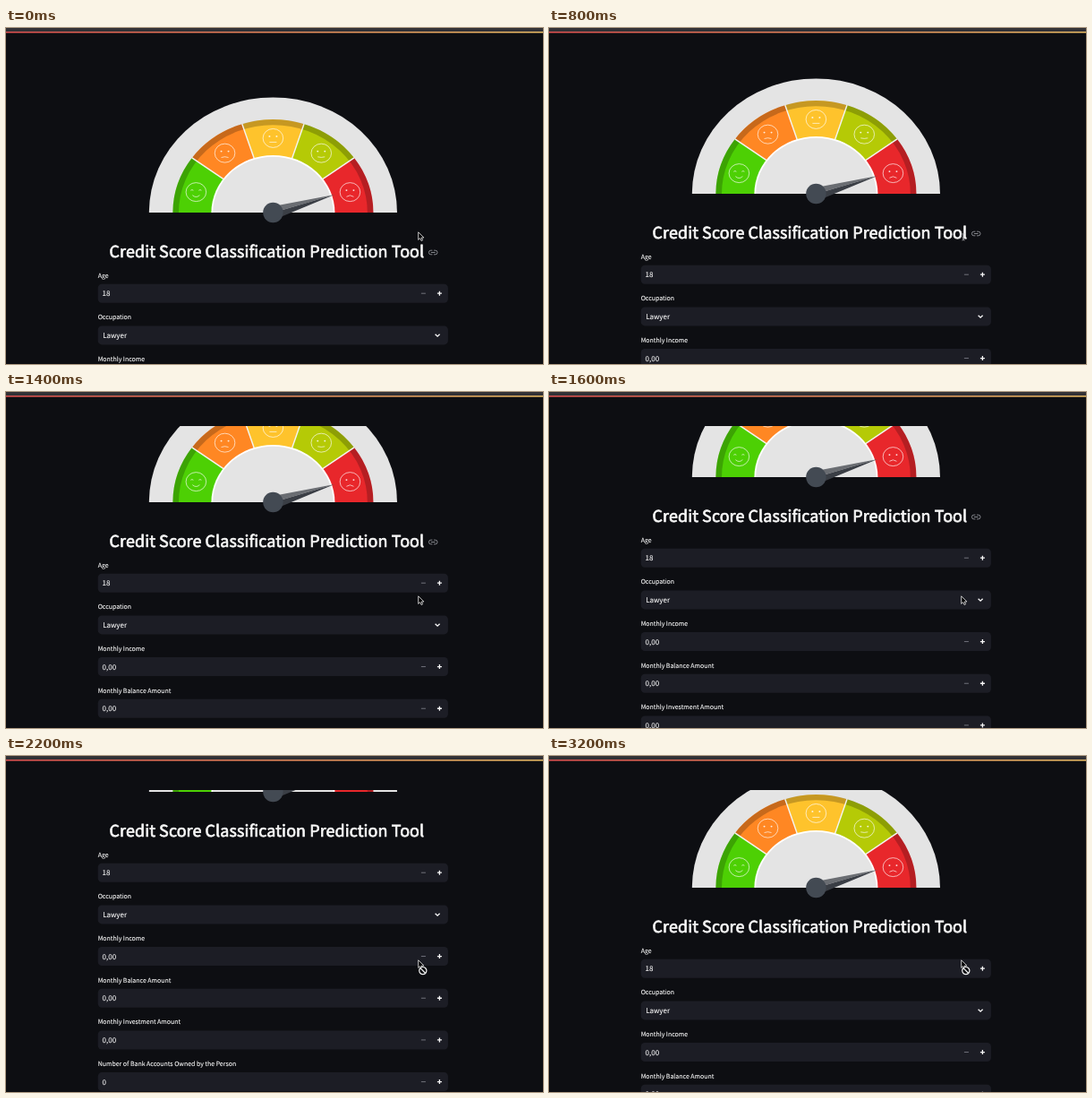
Animation of 600 by 375 pixels, one loop 3300 ms. Source, as an HTML page:

```html
<!DOCTYPE html>
<html lang="en">
<head>
<meta charset="utf-8">
<title>Credit score form</title>
<style>
  html, body { margin: 0; width: 100%; height: 100%; overflow: hidden; background: #0d0e12; }
  svg { display: block; width: 100vw; height: 100vh; }
  text {
    font-family: "Noto Sans CJK JP", "Noto Sans CJK SC", "Noto Sans CJK KR", "Noto Sans", sans-serif;
    font-weight: 400; fill: #fafafa; text-rendering: geometricPrecision;
  }
  .title { font-size: 17.9px; letter-spacing: .1px; stroke: #fafafa; stroke-width: .7px; }
  .label { font-size: 6.97px; stroke: #fafafa; stroke-width: .1px; }
  .value { font-size: 7.96px; stroke: #fafafa; stroke-width: .1px; }
</style>
</head>
<body>
<svg viewBox="0 0 600 375">
  <defs>
    <linearGradient id="bar">
      <stop offset="0" stop-color="#e05252"/>
      <stop offset="1" stop-color="#ebbd66"/>
    </linearGradient>
  </defs>
  <rect width="600" height="375" fill="#0d0e12"/>
  <g id="page">
    <g id="gauge" transform="translate(298.4 206) scale(1 .928)"></g>
    <path d="M367 186L301 198.5L299 206Z" fill="#6a6d72"/>
    <path d="M367 186L299 206L306 211.2Z" fill="#3a3e45"/>
    <circle cx="298.4" cy="206" r="11.2" fill="#434a53"/>
    <text class="title" x="291.4" y="255.8" text-anchor="middle">Credit Score Classification Prediction Tool</text>
    <g id="link" fill="none" stroke="#85878d" stroke-linecap="round">
      <path d="M476 248.2h-1.3a2.3 2.3 0 0 0 0 4.6h1.3M478.400 248.200h1.300a2.300 2.300 0 0 1 0 4.600h-1.300M475.200 250.500h4"/>
    </g>
    <g id="form"></g>
  </g>
  <rect width="600" height="38" fill="#0d0e12"/>
  <rect width="600" height="4" fill="#333236"/>
  <rect y="4" width="600" height="1.500" fill="url(#bar)"/>
  <g id="arrow" transform="translate(460.700 227.800)">
    <path d="M0 0V8.600L2 6.800L3.300 9.700L4.800 9L3.600 6.200H6.200Z" fill="#050506" stroke="#f0f0f0" stroke-width=".8"/>
  </g>
  <g id="ban" transform="translate(465.800 239.600)" fill="#0d0e12" stroke="#f4f4f4" stroke-width="1.200">
    <circle r="4.100"/>
    <path d="M-2.900 -2.900L2.900 2.900"/>
  </g>
  <path id="beam" d="M461.500 229.500q1.500 0 1.500 1v5.500q0 1 -1.500 1M464.500 229.500q-1.500 0 -1.500 1v5.500q0 1 1.500 1M462 234h2"
        fill="none" stroke="#c4c4c8" stroke-width=".7"/>
</svg>
<script>
const $ = id => document.getElementById(id);

function polar(r, deg) {
  const a = deg * Math.PI / 180;
  return [-r * Math.cos(a), -r * Math.sin(a)].map(v => v.toFixed(2));
}

const half = (r, fill, extra = "") =>
  `<path d="M${-r} 0A${r} ${r} 0 0 1 ${r} 0Z" fill="${fill}" ${extra}/>`;

function sector(r, from, to, fill) {
  return `<path d="M0 0L${polar(r, from)}A${r} ${r} 0 0 1 ${polar(r, to)}Z" fill="${fill}"/>`;
}

function face(i, bend) {
  const eyes = i === 0
    ? '<path d="M-6 -2q1.500 -1.400 3 0M3 -2q1.500 -1.400 3 0"/>'
    : '<path d="M-4 -2.200h.01M4 -2.200h.01" stroke-width="2" stroke-linecap="round"/>';
  const y = 4.8 - bend / 2;
  return `<g transform="translate(${polar(89.5, 16 + 37 * i)})" fill="none" stroke="#fff" stroke-opacity=".85" stroke-width=".8">
    <circle r="11.300"/>${eyes}<path d="M-4 ${y}Q0 ${y + bend * 2} 4 ${y}"/></g>`;
}

function drawGauge() {
  const colors = ["#4dd004", "#ff8723", "#fec32c", "#b5ca06", "#e8272b"];
  const bends = [2, -.9, 0, .6, -1.6];
  const spokes = [36, 72, 108, 144]
    .map(a => `<path d="M0 0L${polar(112, a)}" stroke="#f4f4f0" stroke-width="1.500"/>`);
  const rim = '<path d="M-108.700 0A108.700 108.700 0 0 1 108.700 0" fill="none" stroke="#000" stroke-opacity=".22" stroke-width="6.600"/>';
  $("gauge").innerHTML = half(138.6, "#e4e4e4")
    + colors.map((c, i) => sector(112, 36 * i, 36 * i + 36, c)).join("")
    + rim + spokes.join("")
    + half(69, "#fff") + half(67.2, "#e4e4e4")
    + bends.map((b, i) => face(i, b)).join("");
}

function field([label, value], i) {
  const y = 46.68 * i;
  const select = value === "Lawyer";
  const controls = select
    ? '<path d="M479.600 295l2.500 2.500l2.500 -2.500" fill="none" stroke="#fafafa" stroke-width="1.300"/>'
    : `<path d="M463.900 296.200h5" stroke="#70717a"/>
       <path d="M481.900 296.200h5M484.400 293.700v5" stroke="#fafafa" stroke-width="1.300"/>`;
  return `<g transform="translate(0 ${y})">
    <text class="label" x="102.700" y="278.600">${label}</text>
    <rect x="102.700" y="285.700" width="391.200" height="21" rx="4.400" fill="#1c1d25"/>
    <text class="value" x="${select ? 108.2 : 107.6}" y="299.200">${value}</text>${controls}</g>`;
}

drawGauge();
$("form").innerHTML = [
  ["Age", "18"],
  ["Occupation", "Lawyer"],
  ["Monthly Income", "0,00"],
  ["Monthly Balance Amount", "0,00"],
  ["Monthly Investment Amount", "0,00"],
  ["Number of Bank Accounts Owned by the Person", "0"]
].map(field).join("");

const LOOP = 3300, TICK = 100;
// [time in ms, scroll in px]
const stops = [[0, 0], [400, 0], [500, 2], [600, 6], [800, 21], [1200, 55], [1600, 111],
  [2000, 156], [2200, 166], [2900, 166], [3000, 150], [3100, 108], [3200, 59]];

function scrollAt(t) {
  const n = stops.findIndex(s => s[0] >= t);
  if (n < 1) return stops[0][1];
  const [t0, a] = stops[n - 1], [t1, b] = stops[n];
  return a + (b - a) * (t - t0) / (t1 - t0);
}

const show = (id, on) => $(id).setAttribute("visibility", on ? "visible" : "hidden");

function render(now) {
  const t = Math.floor(now % LOOP / TICK) * TICK;
  const beam = t >= 600 && t < 1100;
  $("page").setAttribute("transform", `translate(0 ${-Math.round(scrollAt(t))})`);
  show("beam", beam);
  show("arrow", !beam);
  show("ban", t >= 2100);
  show("link", t < 2000);
}

const start = performance.now();
function loop() {
  render(performance.now() - start);
  requestAnimationFrame(loop);
}
loop();
</script>
</body>
</html>
```
